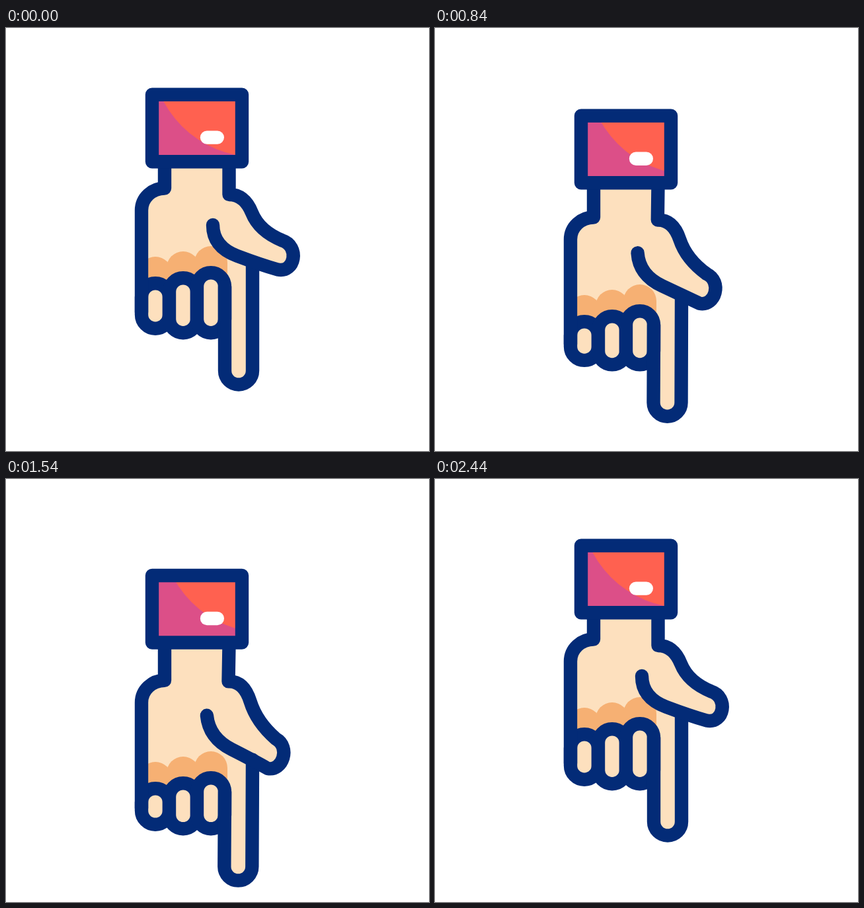
An HTML page with a canvas that plays this animation: 640 by 640 pixels, repeating every 3.08 s.

```html
<!DOCTYPE html>
<html lang="en">
<head>
<meta charset="utf-8">
<title>Pointing hand</title>
<style>
  html, body { margin: 0; height: 100%; overflow: hidden; background: #fff; }
  canvas { display: block; width: 100vw; height: 100vh; }
</style>
</head>
<body>
<canvas width="640" height="640"></canvas>
<script>
const ctx = document.querySelector('canvas').getContext('2d');
const NAVY = '#032b77', SKIN = '#fde0be', SHADE = '#f6b073';
const RED = '#ff6150', PINK = '#dc4f88', WHITE = '#fff';
const LOOP = 3080;
const TURNS = [200, 678, 1121, 1580, 2442]; // down, up, down, up

// 0 at rest, 1 fully stretched downwards
function stretchAt(time) {
  const i = TURNS.findIndex(turn => time < turn);
  if (i < 1) return 0;
  const u = (time - TURNS[i - 1]) / (TURNS[i] - TURNS[i - 1]);
  const eased = u * u * (3 - 2 * u);
  return i % 2 ? eased : 1 - eased;
}

function paint(shape, fill, stroke) {
  const path = typeof shape === 'string' ? new Path2D(shape) : shape;
  if (fill) { ctx.fillStyle = fill; ctx.fill(path); }
  if (stroke) { ctx.strokeStyle = stroke; ctx.stroke(path); }
}

function capsule(x, top, bottom, radius) {
  const path = new Path2D();
  path.roundRect(x - radius, top, 2 * radius, bottom - top, radius);
  return path;
}

function drawHand(p) {
  const at = (x, y, dx, dy) => [x + dx * p, y + dy * p];
  const middle = (a, b) => a.map((v, i) => (v + b[i]) / 2);
  const wrist = 205 + 46.3 * p, shoulder = 63.5 * p;
  const knuckle = 83.7 * p, tip = 69.5 * p;

  const corner = at(337.5, 252, -1, 55.5);
  const base = at(361, 252, -1, 54.6), bend = at(383, 307, -4, 61.8);
  const upper = at(418, 321.5, -10, 73), lower = at(411, 365.5, -15.5, 74);
  const web = at(386, 358.5, -10.3, 69.5), fold = at(313, 331, -6, 62);
  const creaseEnd = at(313, 298, -9.3, 61);

  const thumb = `M337.5,${wrist} L${corner} Q${base} ${middle(base, bend)} Q${bend} ${upper}
    C${at(444.5, 330, -14, 77)} ${at(437.5, 371, -19, 73)} ${lower} Q${web} ${middle(web, fold)}`;
  const left = `L205,${276 + shoulder} c0,-19 16,-33.5 35,-33.5 V${wrist}`;
  const lean = 0.7 * p;
  const index = `373,${360 + 66 * p} L${373 - lean},${518.5 + tip} a21,21 0 0 1 -42,0 L331,${391.5 + knuckle}`;

  paint(`${thumb} L${index} H205 ${left} Z`, SKIN);
  const fingers = [0, 1, 2].map(i => ({
    x: 226 + 42 * i,
    top: 386.2 - 8 * i + knuckle,
    bottom: Math.min(454.7 + 7 * i, 461.2) + tip
  }));
  for (const { x, top } of fingers) paint(capsule(x, top - 40.2, top + 40, 25), SHADE);
  for (const { x, top, bottom } of fingers) paint(capsule(x, top, bottom, 21), SKIN, NAVY);
  paint(`M205,${430 + tip} ${left}`, null, NAVY);
  paint(`M${index}`, null, NAVY);
  paint(`${thumb} Q${fold} ${creaseEnd}`, null, NAVY);
}

function drawCuff(p) {
  ctx.save();
  ctx.translate(0, 46.3 * p);
  const band = new Path2D('M221,100.7 H357 V202.2 H221 Z');
  paint(band, PINK);
  ctx.save();
  ctx.clip(band);
  const light = new Path2D();
  light.arc(378 + 14.7 * p, 37 - 8 * p, 158, 0, 2 * Math.PI);
  paint(light, RED);
  ctx.restore();
  paint('M304,165.6 H319.8', null, WHITE);
  paint(band, null, NAVY);
  ctx.restore();
}

function frame(now) {
  const p = stretchAt(now % LOOP);
  ctx.fillStyle = WHITE;
  ctx.fillRect(0, 0, 640, 640);
  drawHand(p);
  drawCuff(p);
  requestAnimationFrame(frame);
}

ctx.lineWidth = 20.4;
ctx.lineCap = ctx.lineJoin = 'round';
requestAnimationFrame(frame);
</script>
</body>
</html>
```
